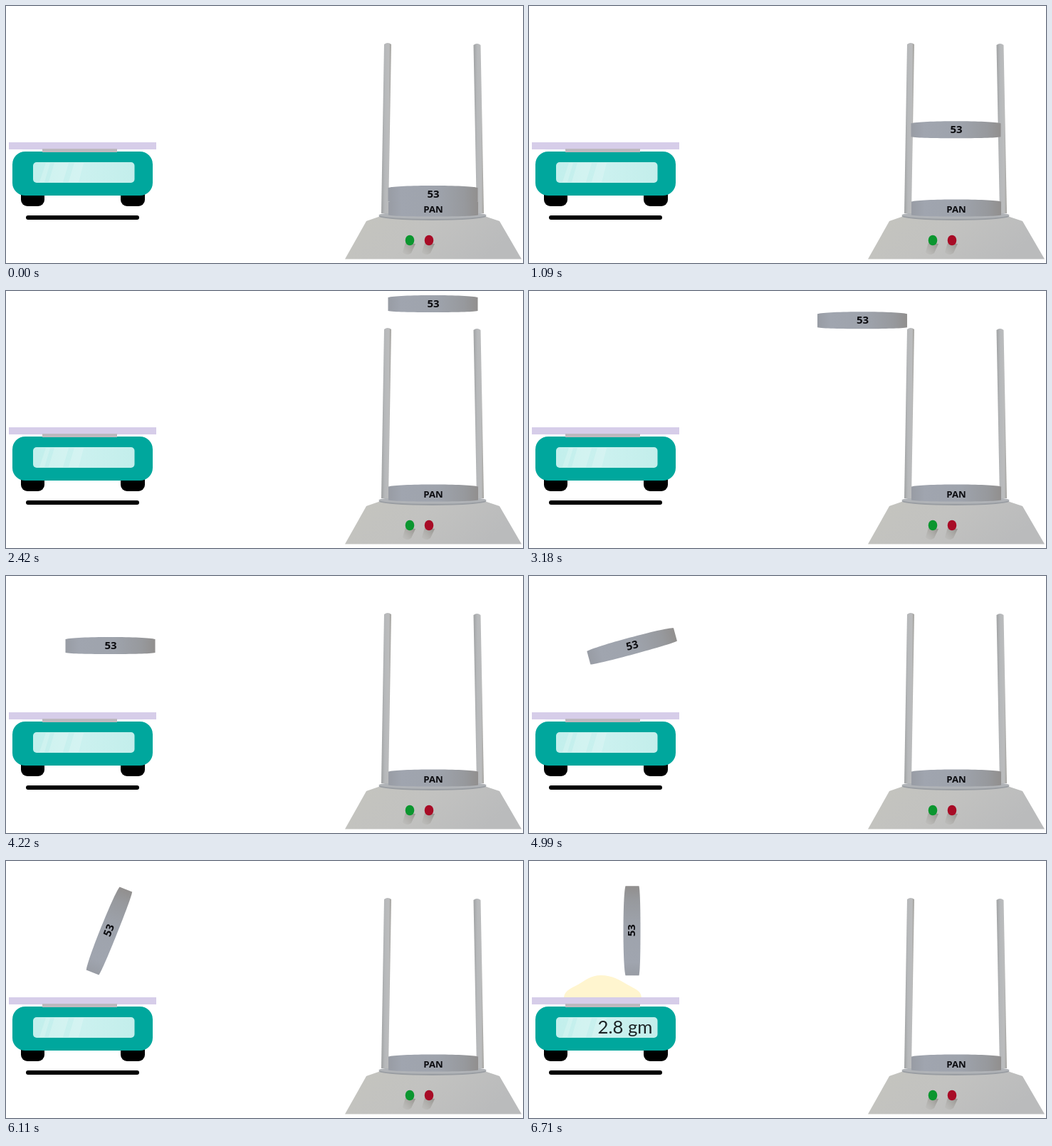
Animation, 726 px wide and 362 px high, one loop 6.87 s. Source, as an HTML page:

```html
<!DOCTYPE html>
<html lang="en">
<head>
<meta charset="utf-8">
<title>Weighing a sieve</title>
<style>
  html, body { margin: 0; width: 100%; height: 100%; overflow: hidden; background: #fff; }
  svg { display: block; width: 100%; height: 100%; }
  .label { font: bold 15px "Open Sans", "Noto Sans", sans-serif; text-anchor: middle; fill: #0c0c10; }
  .reading { font: 25.7px Lato, "Open Sans", sans-serif; text-anchor: end; fill: #1c2426; }
</style>
</head>
<body>
<svg viewBox="0 0 726 362">
  <defs>
    <linearGradient id="metal">
      <stop offset="0" stop-color="#989ca4"/>
      <stop offset=".15" stop-color="#a0a5af"/>
      <stop offset=".55" stop-color="#9ea3ac"/>
      <stop offset=".85" stop-color="#97999d"/>
      <stop offset="1" stop-color="#918f8e"/>
    </linearGradient>
    <linearGradient id="rod">
      <stop offset="0" stop-color="#9fa1a2"/>
      <stop offset=".35" stop-color="#b6b8ba"/>
      <stop offset=".75" stop-color="#bbbcbd"/>
      <stop offset="1" stop-color="#a3a19c"/>
    </linearGradient>
    <linearGradient id="base" x2="1" y2=".3">
      <stop offset="0" stop-color="#c4c4be"/>
      <stop offset=".5" stop-color="#c2c2c0"/>
      <stop offset="1" stop-color="#babbbc"/>
    </linearGradient>
    <linearGradient id="glass">
      <stop offset="0" stop-color="#c2efec"/>
      <stop offset=".5" stop-color="#cbf1ef"/>
      <stop offset="1" stop-color="#c3eeeb"/>
    </linearGradient>
    <linearGradient id="shade" x1="1" y1="0" x2="0" y2="1">
      <stop offset="0" stop-color="#85827c" stop-opacity=".8"/>
      <stop offset="1" stop-color="#a9a7a2" stop-opacity=".1"/>
    </linearGradient>
    <path id="ring" d="M-63 -9C-56 -11 -30 -12 0 -12S56 -11 63 -9V10C56 11.500 30 12 0 12S-56 11.500 -63 10Z" fill="url(#metal)"/>
    <g id="lamp">
      <path d="M-6 3L-10 17Q-5 23 2 18L8 5Z" fill="url(#shade)"/>
      <ellipse rx="6.300" ry="7.300"/>
    </g>
  </defs>

  <!-- Balance -->
  <rect x="21" y="256" width="33" height="26" rx="9"/>
  <rect x="161" y="256" width="34" height="26" rx="9"/>
  <rect x="28" y="295" width="159" height="6" rx="3"/>
  <rect x="9" y="205" width="197" height="62" rx="18" fill="#00a79d"/>
  <rect x="38" y="220" width="142.500" height="29" rx="5" fill="url(#glass)"/>
  <g fill="#fff" opacity=".2">
    <path d="M56 221H62L54 248H47Z"/>
    <path d="M68 221H88L80 248H60Z"/>
    <path d="M96 221H109L102 248H88Z"/>
  </g>
  <path id="heap" d="M49 192C50 182 60 179 69 174C79 168 87 161 101 161C117 161 128 168 138 174C148 180 157 182 158 192Z" fill="#fff5cf"/>
  <rect x="4" y="192" width="207" height="10" fill="#d6cde9"/>
  <rect x="51" y="201" width="105" height="5" fill="#bdb9be"/>
  <text id="reading" class="reading" x="173.500" y="243">2.8 gm</text>

  <!-- Stand -->
  <path d="M506 303L526 296H672L693 303L724 356.500H476Z" fill="url(#base)"/>
  <ellipse cx="599" cy="296" rx="75.500" ry="6" fill="#999da2"/>
  <ellipse cx="599" cy="294.500" rx="75.500" ry="5.300" fill="#b0b3b7"/>
  <use href="#lamp" x="567" y="330" fill="#0b962f"/>
  <use href="#lamp" x="594" y="330" fill="#a80b26"/>
  <path d="M531 54Q536 50 541 54L537 292H527Z" fill="url(#rod)"/>
  <path d="M656.500 55Q661.500 51 666.500 55L671 292H661Z" fill="url(#rod)"/>
  <use href="#ring" x="600" y="284.500"/>
  <text class="label" x="600" y="291" style="font-size:13.200px">PAN</text>

  <g id="sieve">
    <use href="#ring"/>
    <text class="label" x=".5" y="4.800">53</text>
  </g>
</svg>
<script>
  const LOOP = 6870;
  const $ = id => document.getElementById(id);
  const sieve = $("sieve"), heap = $("heap"), reading = $("reading");

  const span = (t, from, to) => Math.min(1, Math.max(0, (t - from) / (to - from)));
  const ease = u => u < 0.5 ? 2 * u * u : 1 - 2 * (1 - u) ** 2;
  const show = (el, on) => el.setAttribute("visibility", on ? "visible" : "hidden");

  function draw(t) {
    const lift = ease(span(t, 250, 2210));
    const carry = ease(span(t, 2490, 4305));
    const turn = span(t, 4670, 6570);
    const x = 599.5 - 455 * carry;
    const y = 265 - 247 * lift + 80.3 * carry;
    sieve.setAttribute("transform", `translate(${x} ${y}) rotate(${-90 * turn})`);
    show(heap, t >= 6670);
    show(reading, t >= 6710);
  }

  // The picture advances in 40 ms steps after each rest.
  function stepped(t) {
    const start = t < 2420 ? 250 : t < 4670 ? 2420 : 4670;
    return t < start ? t : start + Math.floor((t - start) / 40) * 40;
  }

  const origin = performance.now();
  function tick(now) {
    draw(stepped(Math.max(0, now - origin) % LOOP));
    requestAnimationFrame(tick);
  }
  draw(0);
  requestAnimationFrame(tick);
</script>
</body>
</html>
```
